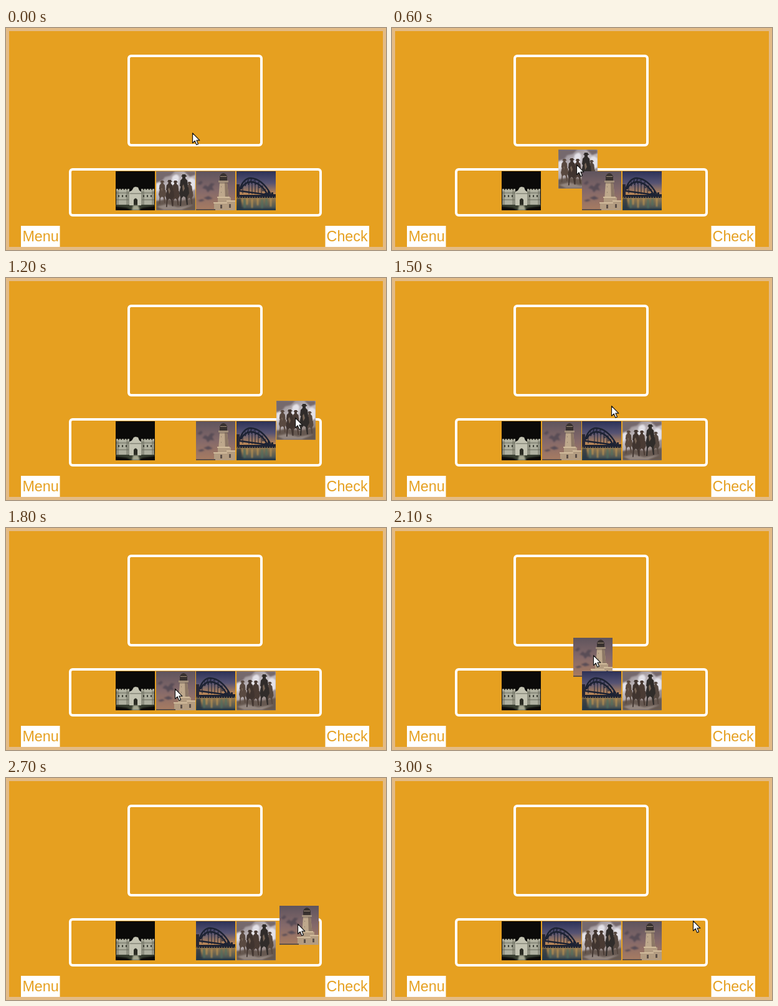
An HTML page for the animation above (3.6 s loop, 610 px wide and 358 px high).

```html
<!DOCTYPE html>
<html lang="en">
<head>
<meta charset="utf-8">
<title>Picture sorting</title>
<style>
  html, body { margin: 0; width: 100%; height: 100%; overflow: hidden; background: #e6a020; }
  svg { position: absolute; left: 0; top: 0; display: block; }
  .stage { width: 610px; height: 358px; }
  .tile { width: 63px; height: 63px; overflow: hidden; }
  .label { font: 23.3px Arial, "Liberation Sans", sans-serif; fill: #e6a020; }
  .soft { filter: blur(.8px); }
  .tile, .cursor { animation: 3600ms step-end infinite; }

  .fort { transform: translate(176px, 231px); }
  .riders { animation-name: riders; z-index: 1; }
  .tower { animation-name: tower; z-index: 2; }
  .bridge { animation-name: bridge; z-index: 3; }
  .cursor { animation-name: cursor; z-index: 9; width: 15px; height: 22px; }

  @keyframes riders {
    0%            { transform: translate(241px, 231px); z-index: 1; }
    16.666%       { transform: translate(267px, 196px); z-index: 1; }
    25%           { transform: translate(347px, 192px); z-index: 1; }
    33.333%       { transform: translate(434px, 198px); z-index: 1; }
    41.666%       { transform: translate(370px, 231px); z-index: 4; }
    83.333%, 100% { transform: translate(305px, 231px); z-index: 4; }
  }
  @keyframes tower {
    0%            { transform: translate(305px, 231px); }
    41.666%       { transform: translate(241px, 231px); }
    58.333%       { transform: translate(291px, 177px); }
    66.666%       { transform: translate(364px, 177px); }
    75%           { transform: translate(439px, 206px); }
    83.333%, 100% { transform: translate(370px, 231px); }
  }
  @keyframes bridge {
    0%            { transform: translate(370px, 231px); }
    41.666%       { transform: translate(305px, 231px); }
    83.333%, 100% { transform: translate(241px, 231px); }
  }
  @keyframes cursor {
    0%            { transform: translate(298px, 168px); }
    8.333%        { transform: translate(269px, 256px); }
    16.666%       { transform: translate(295px, 219px); }
    25%           { transform: translate(376px, 217px); }
    33.333%       { transform: translate(463px, 224px); }
    41.666%       { transform: translate(351px, 205px); }
    50%           { transform: translate(270px, 258px); }
    58.333%       { transform: translate(322px, 204px); }
    66.666%       { transform: translate(393px, 204px); }
    75%           { transform: translate(467px, 234px); }
    83.333%, 100% { transform: translate(482px, 229px); }
  }
</style>
</head>
<body>
<svg class="stage" viewBox="0 0 610 358">
  <rect width="610" height="358" fill="#e3bb86"/>
  <rect x="5" y="5" width="600" height="348" fill="#e6a020"/>
  <g fill="none" stroke="#fff" stroke-width="4">
    <rect x="197" y="45" width="213" height="144" rx="4"/>
    <rect x="103" y="228" width="402" height="74" rx="4"/>
  </g>
  <path fill="#fff" d="M24 319h62.5v34H24zM512.5 319H583v34h-70.5z"/>
  <text class="label" x="26.4" y="344">Menu</text>
  <text class="label" x="514.6" y="344">Check</text>
</svg>

<svg class="tile fort" viewBox="0 0 63 63">
  <rect width="63" height="63" fill="#0b0a09"/>
  <path class="soft" fill="#3a4032" d="M0 53h63v3l-20 3-7 4H25l-7-4-18-2z"/>
  <path fill="#8f9081" d="M1 30h21v24H1zM41 30h21v24H41z"/>
  <path fill="#aeaf9f" d="M5 30h12v24H5zM46 30h12v24H46z"/>
  <path fill="#c3c3b2" d="M22 33l4-2 3-5 3-1 4 1 2 5 3 2v22H22z"/>
  <path stroke="#b9b9a8" stroke-width="3" stroke-dasharray="3 1.5" d="M1 30h21M41 30h21"/>
  <path stroke="#66685b" d="M1 35h21M41 35h21M23 36h18M1 46h20M42 46h20"/>
  <path stroke="#34362d" stroke-width="3" stroke-dasharray="2 4" d="M4 40h17M44 40h17"/>
  <path fill="#2b2c24" d="M29 55V46q3-5 6 0v9z"/>
  <path class="soft" fill="#a5a791" d="M28 55h8l3 8H26z"/>
</svg>

<svg class="tile riders" viewBox="0 0 63 63">
  <defs>
    <linearGradient id="smoke" x1="0" y1="0" x2=".5" y2="1">
      <stop stop-color="#83777a"/><stop offset=".45" stop-color="#c3bdc2"/><stop offset="1" stop-color="#8a7a74"/>
    </linearGradient>
    <g id="rider">
      <path d="M3 3q2-1 2-3h5q0 2 3 3l-3 1v3l3 3 1 9-3 3H4l-3-3 1-9 3-3V4z"/>
      <path d="M4 17l3-4 4 4 4 5 1 9-3 6 1 13h-2l-2-12-3-2-3 3-1 13H1l1-14-2-7 2-9z"/>
    </g>
  </defs>
  <rect width="63" height="63" fill="url(#smoke)"/>
  <g class="soft">
    <path fill="#75696d" d="M0 0h30l-7 7-9 2-4 6-10 3zM45 0h18v6l-9 3z"/>
    <path fill="#e4e2e8" d="M26 9q8-8 11 1l-3 14-11 2zM51 13q8-5 12 2v14l-9 3zM0 20l6-3 2 10-8 7z"/>
    <path fill="#665850" d="M0 48l18-3 20 3 25-5v20H0z"/>
    <path fill="#93867f" d="M1 57l16-4 18 5 25-4-19 8H12z"/>
  </g>
  <use href="#rider" fill="#594940" transform="translate(4 15) scale(.76 .72)"/>
  <use href="#rider" fill="#564840" transform="translate(48 17) scale(.72)"/>
  <use href="#rider" fill="#4a3b34" transform="translate(25 15) scale(.8)"/>
  <use href="#rider" fill="#40342f" transform="translate(15 14) scale(.88 .84)"/>
  <use href="#rider" fill="#302c2a" transform="translate(37 5) scale(1 .98)"/>
  <path fill="#776557" d="M19 29l2-3 2 6-2 5zM42 24l2-3 2 7-3 5zM8 28l2-1v6z"/>
</svg>

<svg class="tile tower" viewBox="0 0 63 63">
  <linearGradient id="dusk" x1="0" y1="0" x2="0" y2="1">
    <stop stop-color="#5f545d"/><stop offset=".5" stop-color="#84696a"/><stop offset="1" stop-color="#a87c61"/>
  </linearGradient>
  <rect width="63" height="63" fill="url(#dusk)"/>
  <path class="soft" fill="#594d56" d="M10 27l5-5 4 3 5-6 6 1-4 5 3 6-6-1-4 4-3-5zM2 20l6-5 3 3-4 4zM12 43l8-3 7 4-8 2zM3 47l7-2 4 2-7 2z"/>
  <path fill="#bea88c" d="M38 18h12l3 28H36z"/>
  <path fill="#8d7866" d="M46 18h4l3 28h-6z"/>
  <path fill="#38312f" d="M38 9q1-5 6-6 5 1 6 6v7H38z"/>
  <path fill="#9f8d79" d="M36 15h16v3H36zM39 8h10v1H39z"/>
  <path stroke="#74655a" d="M37 19h14M40 25h1M40 34h1"/>
  <path fill="#b39c81" d="M35 42h21v7h7v14H29V51h6z"/>
  <path fill="#d2bc9c" d="M34 41h20v2H34zM28 50h22v2H28zM49 47h14v2H49z"/>
  <path fill="#5d5048" d="M39 54h3v6h-3zM53 53h3v6h-3zM0 61h31v2H0z"/>
</svg>

<svg class="tile bridge" viewBox="0 0 63 63">
  <linearGradient id="sky" x1="0" y1="0" x2="0" y2="1">
    <stop stop-color="#2c3157"/><stop offset=".3" stop-color="#565373"/><stop offset=".6" stop-color="#c08a55"/>
    <stop offset=".7" stop-color="#8f7650"/><stop offset="1" stop-color="#364b56"/>
  </linearGradient>
  <rect width="63" height="63" fill="url(#sky)"/>
  <path fill="#202432" d="M0 38h45v-3h3v3h2v-6h3v5h3v-3h3v3h4v6H0z"/>
  <g fill="none" stroke="#1c2233">
    <path stroke-width="2.5" d="M4 33Q10 11 23 11 41 12 55 37M7 29Q13 17 24 17 40 19 50 38"/>
    <path d="M10 21v15M14 16v8l5-11v9l5-10v8l6-7v9l6-5v10l6-4v9l5-3M20 17v20M25 17v20M30 18v19M35 21v16M40 25v13"/>
    <path stroke-width="2.5" d="M0 31l58 8"/>
  </g>
  <path fill="#292835" d="M0 21h5v22H0z"/>
  <path stroke="#e5b762" stroke-dasharray="1 3" d="M1 42h61"/>
  <g class="soft">
    <path stroke="#d3a052" stroke-width="2" opacity=".8" d="M9 45v13M17 44v10M25 45v14M34 44v11M55 44v13"/>
    <path stroke="#4f7262" stroke-width="3" opacity=".8" d="M13 45v14M41 45v15M48 44v11"/>
    <path fill="#1d2b3d" opacity=".65" d="M0 44h7l4 16h52v3H0z"/>
  </g>
</svg>

<svg class="cursor" viewBox="0 0 15 22">
  <path fill="#fff" stroke="#161616" stroke-width="1.2" stroke-linejoin="round"
    d="M1.5 1.5v16l3.7-3.5 2.6 6.3 2.7-1.2-2.6-6h5z"/>
</svg>
</body>
</html>
```
